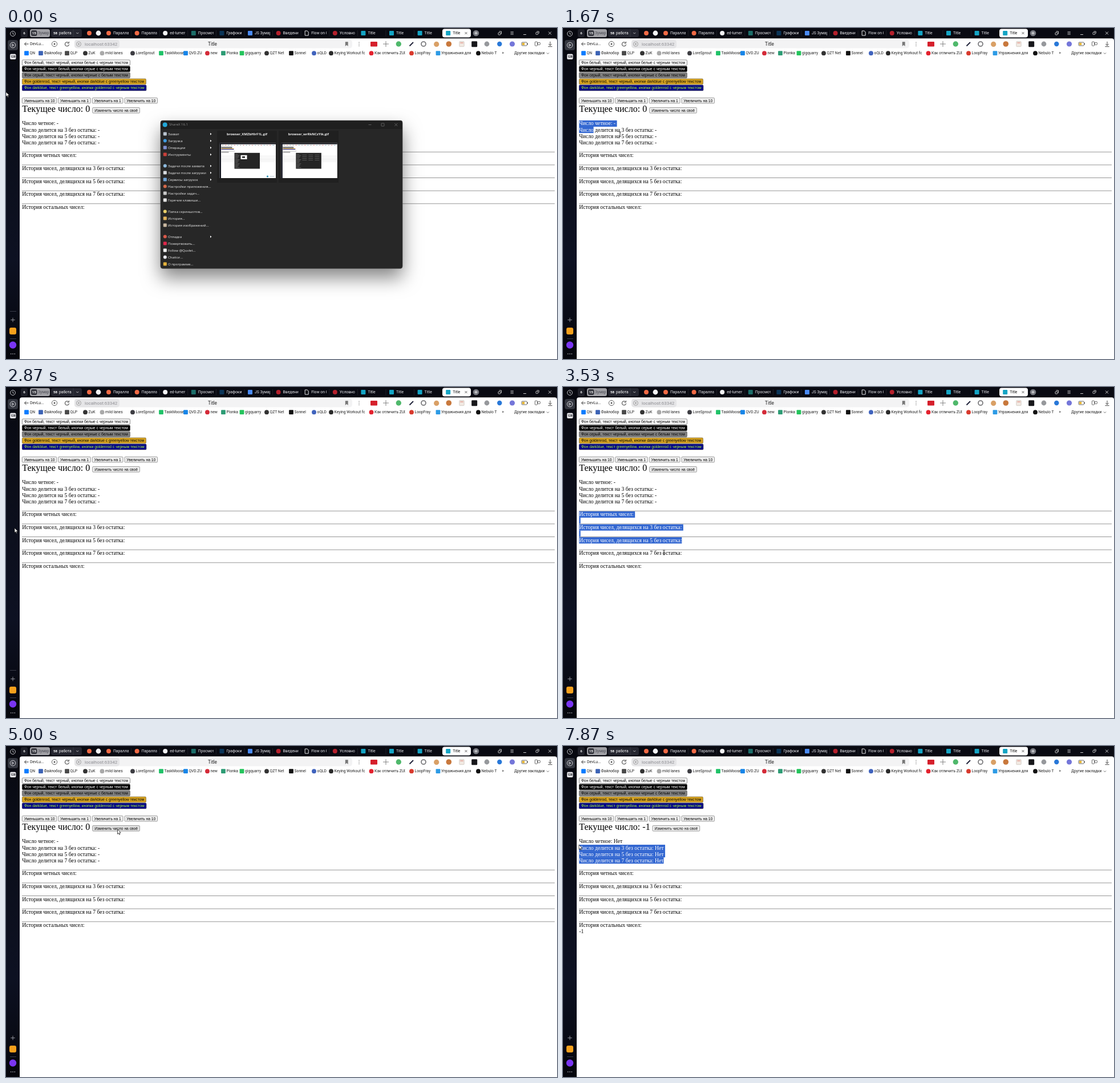
An HTML page with a canvas for the animation above (8000 ms loop, 966 by 580 pixels).

```html
<!DOCTYPE html>
<html lang="ru">
<head>
<meta charset="utf-8">
<title>Title</title>
<style>
html, body { margin: 0; width: 100%; height: 100%; overflow: hidden; background: #fff; }
canvas { display: block; width: 966px; height: 580px; }
</style>
</head>
<body>
<canvas id="stage" width="966" height="580"></canvas>
<script>
const c = document.getElementById('stage').getContext('2d');
const LOOP = 8000, STEP = 1000 / 15;
const UI = 'Roboto, sans-serif', MENU = '"Open Sans", sans-serif';
const SERIF = '"Liberation Serif", serif', SANS = '"Liberation Sans", sans-serif';
const BODY = '9.66px ' + SERIF;

function text(s, x, y, font, color, align = 'left', base = 'alphabetic') {
  c.font = font; c.fillStyle = color; c.textAlign = align; c.textBaseline = base;
  c.fillText(s, x, y);
}
function rect(x, y, w, h, color) { c.fillStyle = color; c.fillRect(x, y, w, h); }
function round(x, y, w, h, r, fill, stroke, lw = 1) {
  c.beginPath(); c.roundRect(x, y, w, h, r);
  if (fill) { c.fillStyle = fill; c.fill(); }
  if (stroke) { c.strokeStyle = stroke; c.lineWidth = lw; c.stroke(); }
}
function dot(x, y, r, fill, stroke, lw = 0.9) {
  c.beginPath(); c.arc(x, y, r, 0, 7);
  if (fill) { c.fillStyle = fill; c.fill(); }
  if (stroke) { c.strokeStyle = stroke; c.lineWidth = lw; c.stroke(); }
}
function line(color, lw, ...p) {
  c.beginPath(); c.moveTo(p[0], p[1]);
  for (let i = 2; i < p.length; i += 2) c.lineTo(p[i], p[i + 1]);
  c.strokeStyle = color; c.lineWidth = lw; c.stroke();
}
function clipped(x, y, w, h, draw) {
  c.save(); c.beginPath(); c.rect(x, y, w, h); c.clip(); draw(); c.restore();
}
function mark(kind, x, y, color, r = 4) {
  if (kind === 'o') dot(x, y, r, color);
  else round(x - r, y - r, 2 * r, 2 * r, 1, color);
}

// pointer: time, x, y, shape (a = arrow, i = text beam), straight motion if 1
const keys = [
  [0, 0, 112, 'a'], [67, 0, 112, 'a'], [933, 41, 172.5, 'i'], [1000, 37, 172.5, 'i'], [1133, 37, 172.5, 'i'],
  [1333, 29, 167, 'i', 1], [1533, 54, 177, 'i', 1], [1667, 100, 186, 'i', 1], [1933, 232, 224, 'i', 1],
  [2000, 232, 224, 'i'], [2867, 15, 247, 'a'], [3200, 29, 222, 'i'], [3400, 150, 279, 'i', 1],
  [3533, 177, 290, 'i', 1], [3733, 179, 290, 'i', 1], [3933, 200, 319, 'i', 1], [4000, 200, 319, 'i'],
  [4267, 202, 332, 'i'], [4867, 196, 149, 'a'], [4933, 195.5, 146.5, 'a', 1], [5000, 195.5, 146, 'a', 1],
  [5333, 63, 129, 'a'], [5667, 63, 129, 'a'], [6333, 101, 129.5, 'a'], [6867, 101, 129.5, 'a'],
  [6933, 137, 156, 'i', 1], [7267, 178, 202, 'i'], [7733, 28.5, 177, 'i'], [7867, 28, 173, 'a', 1], [LOOP, 28, 173, 'a']
];
function pointer(t) {
  let i = 1;
  while (i < keys.length - 1 && keys[i][0] <= t) i++;
  const a = keys[i - 1], b = keys[i];
  let p = Math.min(1, Math.max(0, (t - a[0]) / (b[0] - a[0])));
  if (!b[4]) p = p * p * (3 - 2 * p);
  const x = a[1] + (b[1] - a[1]) * p, y = a[2] + (b[2] - a[2]) * p;
  let shape = p < 0.5 ? a[3] : b[3];
  if (x < 25) shape = 'a';
  return { x, y, shape };
}
function drawPointer({ x, y, shape }) {
  if (shape === 'i') {
    line('#222', 0.9, x, y - 3.5, x, y + 3.5);
    line('#222', 0.8, x - 1.8, y - 3.9, x + 1.8, y - 3.9);
    line('#222', 0.8, x - 1.8, y + 3.9, x + 1.8, y + 3.9);
    return;
  }
  c.beginPath();
  [[0, 0], [0, 8.3], [1.9, 6.6], [3.1, 9.4], [4.4, 8.8], [3.2, 6.1], [5.8, 6]]
    .forEach(([u, v]) => c.lineTo(x + u, y + v));
  c.closePath();
  c.fillStyle = '#fff'; c.fill();
  c.strokeStyle = '#111'; c.lineWidth = 0.75; c.stroke();
}

function sidebar(hover) {
  const g = c.createLinearGradient(0, 0, 0, 580);
  g.addColorStop(0, '#07080f'); g.addColorStop(0.3, '#0b0e1a');
  g.addColorStop(0.7, '#0d1122'); g.addColorStop(1, '#05060c');
  rect(0, 0, 24, 580, g);
  dot(12, 10, 4.4, null, '#d4d5da');
  line('#d4d5da', 0.9, 12, 7.4, 12, 10.3, 14, 11.2);
  round(3, 21, 18, 18, 4, '#33363f');
  dot(12, 30, 4.8, null, '#e2e2e6');
  line('#e2e2e6', 0.9, 10.7, 27.9, 14, 30, 10.7, 32.1, 10.7, 27.9);
  round(7, 45.5, 10.5, 9.5, 2, '#e6e6ea');
  text('128', 12.2, 50.5, 'bold 5px ' + UI, '#15161d', 'center', 'middle');
  if (hover) rect(7, 496, 11, 1, '#3a3d49');
  line('#a0a2aa', 0.9, 8.3, 511.5, 15.7, 511.5);
  line('#a0a2aa', 0.9, 12, 507.8, 12, 515.2);
  round(6, 525, 12, 12, 3, '#f6a01c');
  rect(7, 544, 11, 1, '#3a3d49');
  dot(12, 555.5, 6.2, '#7a35f2');
  for (const x of [8.7, 12, 15.3]) dot(x, 571, 0.8, '#d0d0d6');
}

const tabs = [
  ['o', '#f06a45', 'Паралла'], ['o', '#f06a45', 'Паралла'], ['o', '#f3f3f5', 'ed-lumery'],
  ['s', '#1c6d69', 'Просмотр'], ['s', '#0b3558', 'Графокит'], ['s', '#4a8af4', 'JS Зумар'],
  ['o', '#b5202c', 'Введение'], ['d', '#fff', 'Flow on G'], ['o', '#b5202c', 'Условное'],
  ['s', '#14a4c4', 'Title'], ['s', '#14a4c4', 'Title'], ['s', '#14a4c4', 'Title'], ['s', '#14a4c4', 'Title']
];
function tabBar() {
  rect(24, 0, 942, 24, '#090a12');
  round(26, 2, 12, 14, 3, '#1f2029');
  text('6', 32, 9.2, 'bold 6.2px ' + UI, '#eee', 'center', 'middle');
  round(42, 2, 35, 14, 3.5, '#a0a0a5');
  round(44, 4, 10.5, 10, 3, '#34353d');
  text('15', 49.2, 9.2, 'bold 6.2px ' + UI, '#fff', 'center', 'middle');
  text('Зумар', 56, 9.2, '6.7px ' + UI, '#4b4c54', 'left', 'middle');
  round(79, 2, 54, 14, 3.5, '#252630');
  text('58', 86.5, 9.2, 'bold 6.2px ' + UI, '#fff', 'center', 'middle');
  text('работа', 93, 9.2, '6.7px ' + UI, '#fff', 'left', 'middle');
  line('#3c3d46', 0.8, 118, 2, 118, 16);
  line('#ccc', 0.9, 123.3, 8, 125.3, 10, 127.3, 8);
  dot(146, 9, 4, '#f06a45'); dot(162, 9, 4.4, '#f3f3f5');
  round(765, 1.5, 50, 15, 4, '#fff');
  tabs.forEach(([kind, color, name], i) => {
    const x = 180 + i * 49.6, on = i === 12;
    if (i && !on) line('#292a32', 0.7, x - 10, 4, x - 10, 14);
    if (kind === 'd') {
      line(color, 0.9, x - 3, 5, x + 1, 5, x + 3, 7, x + 3, 13, x - 3, 13, x - 3, 5);
    } else mark(kind, x, 9, color);
    clipped(x + 7, 0, 28, 18, () =>
      text(name, x + 8, 9.2, '6.8px ' + UI, on ? '#111' : '#e8e8ec', 'left', 'middle'));
  });
  line('#444', 0.8, 804.5, 7, 808.5, 11); line('#444', 0.8, 808.5, 7, 804.5, 11);
  dot(824, 9, 5.3, '#777980');
  line('#fff', 0.9, 821.3, 9, 826.7, 9); line('#fff', 0.9, 824, 6.3, 824, 11.7);
  round(863, 8, 4, 4, 1, null, '#ddd', 0.9);
  line('#ddd', 0.9, 864.5, 6, 868.5, 6, 868.5, 10.5);
  for (const y of [6.8, 9, 11.2]) line('#ddd', 0.8, 884.5, y, 889.8, y);
  line('#ddd', 0.9, 907, 11.5, 912, 11.5);
  round(929, 7.6, 3.7, 3.7, 0.5, null, '#ddd', 0.8);
  line('#ddd', 0.8, 930.6, 6, 934.3, 6, 934.3, 9.7);
  line('#ddd', 0.9, 951, 6.5, 956, 11.5); line('#ddd', 0.9, 956, 6.5, 951, 11.5);
}

function toolbar() {
  round(24, 18.3, 942, 40, [4, 4, 0, 0], '#fff');
  line('#222', 0.9, 39.5, 28, 32.5, 28); line('#222', 0.9, 35.6, 25, 32.5, 28, 35.6, 31);
  text('DevLu...', 42, 28.2, '7px ' + UI, '#222', 'left', 'middle');
  dot(85, 28, 4.6, null, '#555');
  dot(85, 28, 1.5, '#555');
  c.beginPath(); c.arc(107, 28.3, 3.6, 0.1, 5.4);
  c.strokeStyle = '#333'; c.lineWidth = 1; c.stroke();
  line('#333', 0.9, 110.4, 23.8, 110.4, 26.6, 107.5, 26.6);
  round(120, 20.8, 487, 14.6, 4.5, '#f3f3f4');
  round(120, 20.8, 79, 14.6, 4.5, '#e5e5e7');
  dot(127.5, 28.1, 4, null, '#999'); dot(127.5, 28.1, 1.4, '#999');
  text('localhost:63342', 138, 28.4, '8px ' + UI, '#8d8d92', 'left', 'middle');
  text('Title', 362, 28.4, '8.2px ' + UI, '#222', 'center', 'middle');
  c.fillStyle = '#777'; c.beginPath();
  [[594.8, 24.3], [599.7, 24.3], [599.7, 32], [597.2, 29.8], [594.8, 32]].forEach(p => c.lineTo(...p));
  c.fill();
  for (const y of [25.2, 28.2, 31.2]) dot(619, y, 0.65, '#555');
  round(639, 24, 12, 8.5, 1, '#d51f2b');
  line('#777', 0.9, 661, 28, 671, 28); line('#777', 0.9, 666, 23, 666, 33);
  dot(688.3, 28, 4.7, '#4fb86b');
  line('#22243b', 2, 707.5, 31.5, 714, 25);
  dot(732, 28, 4, null, '#6b6b6e', 1.6);
  dot(754.7, 28.4, 4.6, '#d9a066');
  dot(776.3, 28, 4.8, '#c8783c');
  round(794.8, 23.6, 8.4, 9, 1, '#f1e9e2', '#c9c1ba', 0.7);
  line('#dd7a6e', 1, 796.3, 26, 801.7, 26);
  round(816.2, 23.2, 10, 10, 1.3, '#17171a');
  dot(843, 28, 4.4, '#96989c');
  dot(865.3, 28, 4.2, '#2878d8');
  dot(887.5, 28, 4.6, '#7476d9');
  round(904, 25, 9.5, 6, 1.2, '#fff', '#444', 0.8);
  rect(905, 26, 4.2, 4, '#e8b93a'); rect(914, 27, 1, 2, '#444');
  round(927.4, 24.2, 4.2, 7, 0.8, null, '#444', 0.8);
  round(932.4, 25.4, 4, 4, 0.8, null, '#444', 0.8);
  line('#333', 0.9, 954, 23.8, 954, 30.5);
  line('#333', 0.9, 951.2, 28, 954, 30.7, 956.8, 28);
  line('#333', 0.9, 950.4, 32.6, 957.6, 32.6);
}

const marks = [
  [36, 's', '#0a7cff', 'QN'], [61, 's', '#3c63b5', 'Файлобор'], [107, 's', '#4a4a4a', 'QLP'],
  [139, 'o', '#343434', 'ZuK'], [168.5, 'o', '#a9a9a9', 'mild lanes'], [222, 'o', '#3d3d42', 'LoreSprout'],
  [272, 's', '#20c268', 'TaskMoose'], [315, 's', '#1685e8', 'QVD.ZU'], [353, 'o', '#d42b39', 'new'],
  [381, 's', '#2e9c75', 'Plonka'], [413.5, 's', '#24c45c', 'gigquarry'], [457, 'o', '#333', 'QZT Net'],
  [500, 's', '#111', 'Sonnel'], [540, 'o', '#4063bd', 'oQLD'], [570, 'o', '#2b2b2b', 'Keying Workout for'],
  [640.5, 'o', '#e3222e', 'Как отличить ZUD'], [711, 'o', '#d83a2d', 'LoopFray'], [757.5, 's', '#2d9be5', 'Упражнения для'],
  [828, 'o', '#111', 'Nebulo T']
];
function bookmarks() {
  const font = '6.7px ' + UI;
  for (const [x, kind, color, name] of marks) {
    mark(kind, x, 44.2, color, 3.9);
    clipped(x + 5, 38, 54, 13, () => text(name, x + 5.6, 44.5, font, '#222', 'left', 'middle'));
  }
  text('»', 871, 44, '8px ' + UI, '#222', 'center', 'middle');
  text('Другие закладки', 891, 44.5, font, '#222', 'left', 'middle');
  line('#444', 0.8, 948, 43.4, 950, 45.4, 952, 43.4);
}

function button(x, y, w, label, p, bg = '#efefef', fg = '#000', edge = '#767676') {
  const hot = p.shape === 'a' && p.x > x && p.x < x + w && p.y > y && p.y < y + 10;
  round(x, y, w, 9.6, 1.3, hot && bg === '#efefef' ? '#e2e2e2' : bg, edge, 0.7);
  text(label, x + w / 2, y + 7.15, '6.71px ' + SANS, fg, 'center');
}
const themes = [
  [189, 'Фон белый, текст черный, кнопки белые с черным текстом', '#fff', '#000', '#555'],
  [189, 'Фон черный, текст белый, кнопки серые с черным текстом', '#000', '#fff', '#333'],
  [189, 'Фон серый, текст черный, кнопки черные с белым текстом', '#808080', '#000', '#555'],
  [217, 'Фон goldenrod, текст черный, кнопки darkblue с greenyellow текстом', '#daa520', '#000', '#6d5a2a'],
  [217.5, 'Фон darkblue, текст greenyellow, кнопки goldenrod с черным текстом', '#00008b', '#adff2f', '#223']
];
const steps = [[28.3, 60.5, 'Уменьшить на 10'], [91.7, 56.5, 'Уменьшить на 1'],
  [151.3, 53.7, 'Увеличить на 1'], [208, 57.5, 'Увеличить на 10']];
const topics = ['четных чисел', 'чисел, делящихся на 3 без остатка', 'чисел, делящихся на 5 без остатка',
  'чисел, делящихся на 7 без остатка', 'остальных чисел'];

// text rows of the page; empty rows are line breaks
function pageRows(clicked) {
  const v = clicked ? 'Нет' : '-', rows = [];
  ['Число четное: ', ...[3, 5, 7].map(n => `Число делится на ${n} без остатка: `)]
    .forEach((s, i) => rows.push({ y: 161.9 + i * 11.07, s: s + v }));
  rows.push({ y: 206.2, s: '' });
  topics.forEach((s, i) => {
    const y = 217.9 + i * 22.65;
    rows.push({ y, s: `История ${s}:` });
    rows.push({ y: y + 11.07, s: i === 4 && clicked ? '-1' : '' });
  });
  return rows;
}
function width(s) { c.font = BODY; return c.measureText(s).width; }
function caret(rows, { x, y }) {
  let i = rows.length - 1;
  while (i > 0 && rows[i].y > y) i--;
  if (!rows[i].s) return { i: i - 1, w: width(rows[i - 1].s) };
  let best = 0;
  for (let n = 1; n <= rows[i].s.length; n++) {
    const w = width(rows[i].s.slice(0, n));
    if (Math.abs(28 + w - x) < Math.abs(28 + best - x)) best = w;
  }
  return { i, w: best };
}
// start, end, anchor, lag behind the pointer
const drags = [[1400, 2120, { x: 28, y: 167 }, 133], [3260, 4250, { x: 28, y: 222 }, 133], [7300, LOOP, { x: 190, y: 201 }, 67]];
function selection(rows, t) {
  const d = drags.find(d => t >= d[0] && t < d[1]);
  if (!d) return;
  let a = caret(rows, d[2]), b = caret(rows, pointer(t - d[3]));
  if (b.i < a.i || (b.i === a.i && b.w < a.w)) [a, b] = [b, a];
  for (let i = a.i; i <= b.i; i++) {
    const { y, s } = rows[i];
    const from = i === a.i ? a.w : 0, to = i === b.i ? b.w : width(s) + 2.5;
    if (to <= from) continue;
    const h = s ? 11.07 : 10.4;
    rect(28.2 + from, y, to - from, h, '#3367d1');
    clipped(28.2 + from, y, to - from, h, () => text(s, 28.2, y + 8.55, BODY, '#fff'));
  }
}
function page(t, p) {
  const clicked = t >= 6595;
  themes.forEach(([w, s, bg, fg, edge], i) => button(28.4, 56 + i * 11.03, w, s, p, bg, fg, edge));
  steps.forEach(([x, w, s]) => button(x, 122.4, w, s, p));
  text('Текущее число: ' + (clicked ? '-1' : '0'), 28.2, 147, '16.1px ' + SERIF, '#000');
  button(clicked ? 157 : 151.7, 139.5, 82.7, 'Изменить число на своё', p);
  for (let i = 0; i < 5; i++) rect(28, 216.8 + i * 22.65, 934, 0.9, '#8a8a8a');
  const rows = pageRows(clicked);
  for (const r of rows) text(r.s, 28.2, r.y + 8.55, BODY, '#000');
  selection(rows, t);
}

// label, y, icon colour, submenu
const menu = [
  ['Захват', 186, '#b9c4cf', 1], ['Загрузка', 198, '#3f9be0', 1], ['Операции', 210, '#7f8fd0', 1],
  ['Инструменты', 222, '#c9403a', 1], ['Задачи после захвата', 242, '#8db9dc', 1],
  ['Задачи после загрузки', 254, '#d7dbe0', 1], ['Сервисы загрузок', 266, '#6fa4d8', 1],
  ['Настройки приложения...', 278, '#d2694a'], ['Настройки задач...', 290, '#c9c9c9'],
  ['Горячие клавиши...', 302, '#e4e4e4'], ['Папка скриншотов...', 322, '#e8cf6a'],
  ['История...', 334, '#e0b25a'], ['История изображений...', 346, '#c9b7a0'],
  ['Отладка', 366, '#d8594a', 1], ['Пожертвовать...', 378, '#e0284c'],
  ['Follow @Quvlet...', 390, '#f2f2f2'], ['Chattor...', 402, '#e8e8ee'], ['О программе...', 414, '#e2b13c']
];
function thumb(x, name, extra) {
  rect(x - 4.5, 180, 105, 91, '#202020');
  text(name, x + 48, 186.2, 'bold 5.9px ' + MENU, '#f0f0f0', 'center', 'middle');
  rect(x, 201.7, 98.5, 61.3, '#fff');
  rect(x, 201.7, 98.5, 2, '#14151c'); rect(x, 201.7, 2.5, 61.3, '#10121c');
  for (let i = 0; i < 18; i++) rect(x + 4 + i * 5.2, 205.3, 3, 0.7, ['#888', '#c66', '#69a'][i % 3]);
  ['#bbb', '#111', '#888', '#daa520', '#00008b'].forEach((k, i) => rect(x + 3, 207.6 + i * 1.15, i < 3 ? 19 : 22, 0.9, k));
  rect(x + 3, 215.5, 24, 0.8, '#aaa');
  rect(x + 3, 217.2, 13, 1, '#666');
  for (let i = 0; i < 5; i++) rect(x + 3, 224.6 + i * 2.3, 95, 0.4, '#ccc');
  rect(x + 26, 218.8, 44.5, 27.8, '#252525');
  for (let i = 0; i < 14; i++) rect(x + 27, 221 + i * 1.8, 5 + i * 3 % 4, 0.6, '#777');
  if (extra) {
    rect(x + 37, 222.8, 11, 7.2, '#fff'); rect(x + 39.5, 224.8, 5, 3, '#333');
    dot(x + 84, 260, 1.6, '#2b8fb5'); rect(x + 88, 259.5, 8, 1, '#b6c6cf');
  } else {
    for (let i = 0; i < 12; i++) rect(x + 37 + i % 3 * 11, 222 + (i / 3 | 0) * 3, 8, 0.6, '#777');
  }
}
function appWindow(t) {
  const p = Math.max(0, (t - 67) / 267);
  if (p >= 1) return;
  c.save();
  c.globalAlpha = 1 - p;
  c.translate(483, 292); c.scale(1 - p * 0.08, 1 - p * 0.08); c.translate(-483, -292);
  c.save();
  c.shadowColor = 'rgba(0,0,0,.48)'; c.shadowBlur = 32; c.shadowOffsetY = 16;
  round(271, 162, 424, 259.5, 4, '#272727');
  c.restore();
  round(271, 162, 424, 15, [4, 4, 0, 0], '#1f1f1f');
  round(270.8, 162.2, 424.4, 259.2, 4, null, '#4a4a4a', 0.6);
  dot(278.7, 169.5, 4, '#23a7d8');
  text('ShareX 16.1', 286, 169.7, '6px ' + MENU, '#8e8e8e', 'left', 'middle');
  line('#777', 0.7, 635.5, 169.5, 640.5, 169.5);
  round(658, 167, 5, 5, 0.6, null, '#777', 0.7);
  line('#777', 0.7, 681.3, 167, 686.3, 172); line('#777', 0.7, 686.3, 167, 681.3, 172);
  menu.forEach(([s, y, color, sub], i) => {
    mark(i % 3 === 1 ? 'o' : 's', 278.8, y - 0.4, color, 3);
    text(s, 284, y + 0.2, '6.05px ' + MENU, '#f0f0f0', 'left', 'middle');
    if (sub) {
      c.fillStyle = '#fff'; c.beginPath();
      c.moveTo(358, y - 2.3); c.lineTo(360.4, y - 0.3); c.lineTo(358, y + 1.7); c.fill();
    }
  });
  thumb(374.5, 'browser_XMZbHlrF1L.gif', true);
  thumb(482.3, 'browser_wrRkNCzYik.gif', false);
  c.restore();
}

function draw(t) {
  const p = pointer(t);
  rect(0, 0, 966, 580, '#fff');
  tabBar();
  sidebar(p.x < 24);
  toolbar();
  bookmarks();
  page(t, p);
  appWindow(t);
  drawPointer(p);
}

let last = -1;
function tick() {
  const k = Math.floor((performance.now() % LOOP + 4) / STEP) % 120;
  if (k !== last) draw((last = k) * STEP + 0.4);
  requestAnimationFrame(tick);
}
tick();
</script>
</body>
</html>
```
